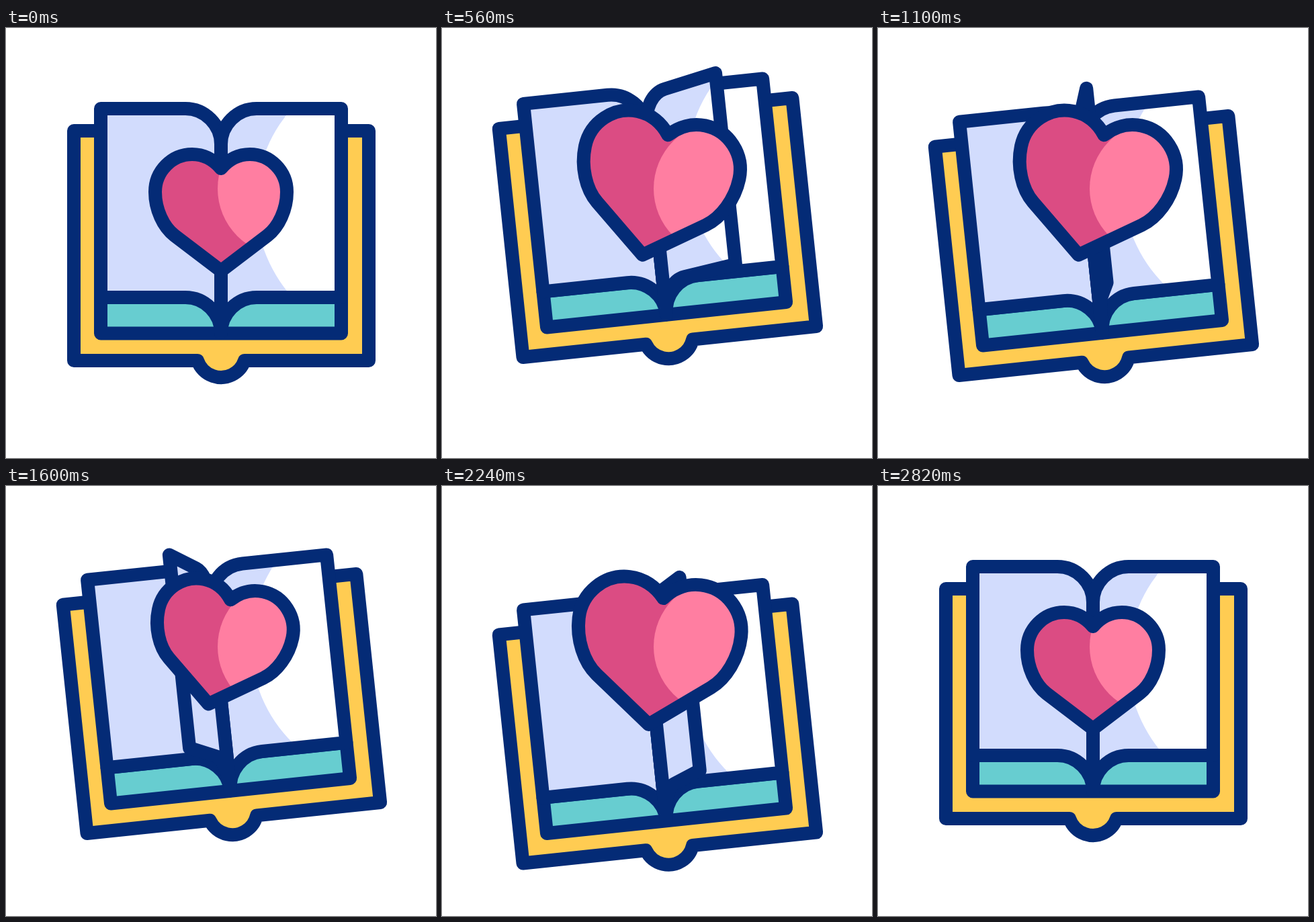
Write an HTML page with a canvas that moves like this. It is 640 px wide and 640 px high and loops after 3600 ms.

```html
<!DOCTYPE html>
<html lang="en">
<head>
<meta charset="utf-8">
<title>Book with a beating heart</title>
<style>
  html, body { margin: 0; width: 100%; height: 100%; overflow: hidden; background: #fff; }
  canvas { display: block; width: 100vmin; height: 100vmin; margin: 0 auto; }
</style>
</head>
<body>
<canvas id="stage" width="640" height="640"></canvas>
<script>
const ctx = document.getElementById('stage').getContext('2d');
const NAVY = '#042b76', YELLOW = '#ffcc52', LILAC = '#d2dcfd', TEAL = '#67cdd0';
const PINK = '#ff7ea1', ROSE = '#db4c83', WHITE = '#fff';

// Time is counted in ticks of 20 ms, 180 ticks to a loop
const TICK = 20, LOOP = 3600;
const MID = 320, HALF = 179, TOP = 120, BASE = 401, ARC = 53;
const FLIP = { first: 23, gap: 20.04, length: 26, count: 5 };

const BOOK_Y = [[0, 0], [13, 47.5], [30, -29.5], [47, 0], [82, 0], [98, -28.5], [114, 47.5], [126, 0]];
const BOOK_TURN = [[0, 0], [13, -6], [114, -6], [126, 0]];
const HEART_Y = [[0, 275], [28, 236.5], [100, 236.5], [132, 275]];
const HEART_TURN = [[0, 0], [28, 12], [97, 12], [129, 0]];
const HEART_SIZE = [[0, 1], [11, 1.3], [22, 1], [32, 1.3], [42, 1], [51, 1.3], [61, 1], [72, 1.3],
  [82.5, 1], [94, 1.31], [104, 1], [116, 1.32], [126, 1.25], [141, 1]];

const ease = u => (1 - Math.cos(Math.PI * u)) / 2;
const rad = deg => deg * Math.PI / 180;

function at(keys, t) {
  for (let i = 1; i < keys.length; i++) {
    const [t0, a] = keys[i - 1], [t1, b] = keys[i];
    if (t < t1) return a + (b - a) * ease((t - t0) / (t1 - t0));
  }
  return keys[keys.length - 1][1];
}

function outline(path) {
  ctx.strokeStyle = NAVY;
  ctx.stroke(path);
}

function fill(path, color) {
  ctx.fillStyle = color;
  ctx.fill(path);
}

// Fills a shape, then a second tone where a disc overlaps it
function twoTone(path, color, tone, x, y, r) {
  fill(path, color);
  ctx.save();
  ctx.clip(path);
  const disc = new Path2D();
  disc.arc(x, y, r, 0, Math.PI * 2);
  fill(disc, tone);
  ctx.restore();
}

// reach runs from HALF (lying right) to -HALF (lying left)
function pagePath(reach, lift) {
  const k = reach / HALF, edge = MID + reach, bend = MID + ARC * k;
  const ctrl = bend - 29 * k, low = lift * 0.67;
  const p = new Path2D();
  p.moveTo(MID, TOP + ARC);
  p.bezierCurveTo(MID, TOP + 24, ctrl, TOP + lift * 0.23, bend, TOP);
  p.lineTo(edge, TOP - lift);
  p.lineTo(edge, BASE - low);
  p.lineTo(bend, BASE);
  p.bezierCurveTo(ctrl, BASE + low * 0.23, MID, BASE + 24, MID, BASE + ARC);
  p.closePath();
  return p;
}

function drawPage(reach, lift) {
  const p = pagePath(reach, lift);
  twoTone(p, LILAC, WHITE, 582, 260, 210);
  outline(p);
}

function coverPath() {
  const p = new Path2D(), a = Math.asin(12 / 37);
  p.moveTo(101, 153);
  p.lineTo(540, 153);
  p.lineTo(540, 495);
  p.lineTo(355, 495);
  p.arc(MID, 483, 37, a, Math.PI - a);
  p.lineTo(101, 495);
  p.closePath();
  return p;
}

function drawBook(t) {
  ctx.save();
  ctx.translate(MID, 320 + at(BOOK_Y, t));
  ctx.rotate(rad(at(BOOK_TURN, t)));
  ctx.translate(-MID, -320);

  const cover = coverPath();
  fill(cover, YELLOW);
  outline(cover);

  const block = new Path2D();
  block.rect(MID - HALF, BASE, HALF * 2, 53.5);
  fill(block, TEAL);
  outline(block);
  drawPage(-HALF, 0);
  drawPage(HALF, 0);

  for (let i = 0; i < FLIP.count; i++) {
    const u = (t - FLIP.first - i * FLIP.gap) / FLIP.length;
    if (u <= 0 || u >= 1) continue;
    const lift = 32 * Math.pow(1 - Math.abs(1 - 2 * u), 0.75);
    drawPage(HALF * (1 - 2 * u), lift);
  }
  ctx.restore();
}

function heartPath() {
  const p = new Path2D();
  p.moveTo(0, -66);
  p.bezierCurveTo(-11, -79, -26, -87, -43, -87);
  p.bezierCurveTo(-73, -87, -98, -62, -98, -31);
  p.bezierCurveTo(-98, -5, -86, 21, -69, 34);
  p.lineTo(0, 86.5);
  p.lineTo(69, 34);
  p.bezierCurveTo(86, 21, 98, -5, 98, -31);
  p.bezierCurveTo(98, -62, 73, -87, 43, -87);
  p.bezierCurveTo(26, -87, 11, -79, 0, -66);
  p.closePath();
  return p;
}

const HEART = heartPath();

// The outline keeps its weight and the shading stays still
function drawHeart(t) {
  const size = at(HEART_SIZE, t);
  const m = new DOMMatrix()
    .translate(MID, at(HEART_Y, t))
    .rotate(at(HEART_TURN, t))
    .scale(size, size);
  const p = new Path2D();
  p.addPath(HEART, m);
  twoTone(p, ROSE, PINK, 415, 239, 100);
  outline(p);
}

function draw(now) {
  const t = Math.floor((now % LOOP) / TICK);
  ctx.fillStyle = WHITE;
  ctx.fillRect(0, 0, 640, 640);
  ctx.lineWidth = 20;
  ctx.lineJoin = ctx.lineCap = 'round';
  drawBook(t);
  drawHeart(t);
}

let start = null;
function loop(now) {
  if (start === null) start = now;
  draw(Math.max(0, now - start));
  requestAnimationFrame(loop);
}
draw(0);
requestAnimationFrame(loop);
</script>
</body>
</html>
```
